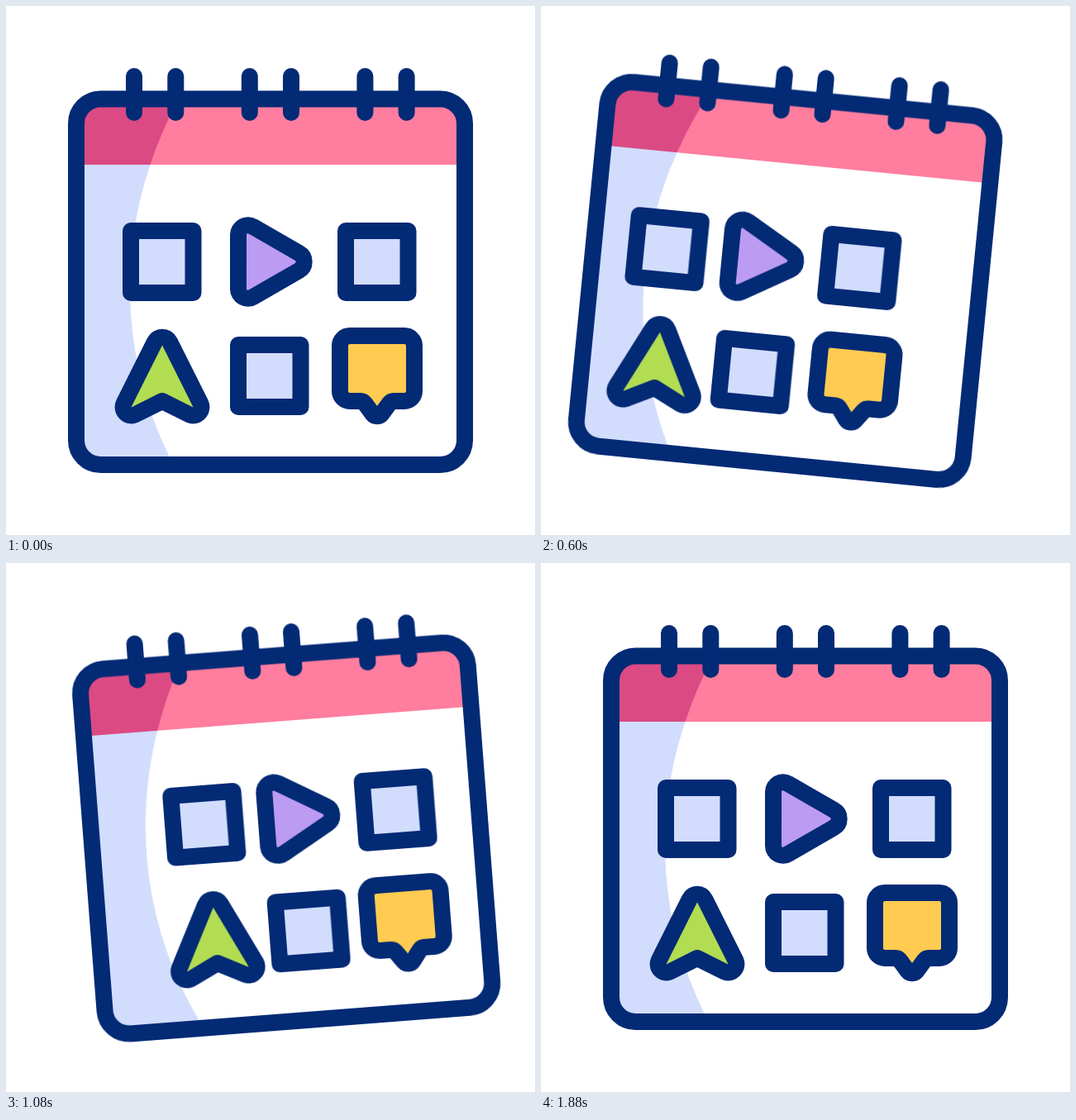
An HTML page that plays this animation: 640 px wide and 640 px high, repeating every 2000 ms.

```html
<!DOCTYPE html>
<html lang="en">
<head>
<meta charset="utf-8">
<title>Swinging calendar</title>
<style>
  html, body { margin: 0; width: 100%; height: 100%; overflow: hidden; background: #fff; }
  svg { display: block; width: 100%; height: 100%; }

  .line { stroke: #032a75; stroke-width: 20; stroke-linecap: round; stroke-linejoin: round; }

  .calendar { transform-origin: 320px 84px; animation: swing 2s infinite; }
  .icon { animation: slide 2s infinite; }

  @keyframes swing {
    0%, 2% { transform: rotate(0deg); animation-timing-function: cubic-bezier(.333, 0, .667, 1); }
    24.5% { transform: rotate(8.05deg); animation-timing-function: cubic-bezier(.333, 0, .667, 1); }
    46.5% { transform: rotate(-7.25deg); animation-timing-function: cubic-bezier(.3, 0, .6, 1); }
    70.5% { transform: rotate(3.1deg); animation-timing-function: cubic-bezier(.2, .2, .4, 1); }
    94%, 100% { transform: rotate(0deg); }
  }

  /* each icon slides left, right, left, then home */
  @keyframes slide {
    0%, 2% { transform: translateX(0); animation-timing-function: cubic-bezier(.33, 0, .45, 1); }
    24.5% { transform: translateX(var(--a)); animation-timing-function: cubic-bezier(.333, 0, .667, 1); }
    46.5% { transform: translateX(var(--b)); animation-timing-function: cubic-bezier(.3, 0, .6, 1); }
    70.5% { transform: translateX(var(--c)); animation-timing-function: cubic-bezier(.3, 0, .55, 1); }
    94%, 100% { transform: translateX(0); }
  }
</style>
</head>
<body>
<svg viewBox="0 0 640 640">
  <g class="calendar">
    <!-- page -->
    <rect x="85" y="112.5" width="470" height="442.5" rx="29.5" fill="#fff"/>
    <path fill="#d2dcfd" d="M90 192H174.5A462 462 0 0 0 198.5 547H112Q90 547 90 525Z"/>
    <path fill="#ff7d9e" d="M90 192V140Q90 118 112 118H528Q550 118 550 140V192Z"/>
    <path fill="#db4a83" d="M90 192V140Q90 118 112 118H206A462 462 0 0 0 174.5 192Z"/>
    <rect class="line" x="85" y="112.5" width="470" height="442.5" rx="29.5" fill="none"/>
    <path class="line" fill="none" d="M155 85V129M205.3 85V129M294.8 85V129M345 85V129M434.4 85V129M484.6 85V129"/>

    <!-- icons -->
    <g class="line">
      <rect class="icon" style="--a:-27.3px;--b:52px;--c:-15.4px" x="151" y="272" width="75.5" height="75" fill="#d2dcfd"/>
      <path class="icon" style="--a:-42.5px;--b:34px;--c:-29.8px" fill="#bc9bf3"
        d="M281 277A11.7 11.7 0 0 1 299 267L354.5 299A12 12 0 0 1 354.5 320L299 352A11.7 11.7 0 0 1 281 342Z"/>
      <rect class="icon" style="--a:-53px;--b:23px;--c:-40.5px" x="411" y="272" width="75.5" height="75" fill="#d2dcfd"/>
      <path class="icon" style="--a:-27px;--b:56px;--c:-15.7px" fill="#b2dc52"
        d="M179.8 406.5A10.2 10.2 0 0 1 198.2 406.5L235.5 481A10.2 10.2 0 0 1 222.3 494.6L189 478L155.7 494.6A10.2 10.2 0 0 1 142.5 481Z"/>
      <rect class="icon" style="--a:-39.6px;--b:37.5px;--c:-27.6px" x="281" y="410" width="75.5" height="75" fill="#d2dcfd"/>
      <path class="icon" style="--a:-44.5px;--b:22.3px;--c:-33.7px" fill="#ffcb50"
        d="M416 399H482A12 12 0 0 1 494 411V466A12 12 0 0 1 482 478H469Q466 478 464 480.5L454.5 493.5A7 7 0 0 1 443.5 493.5L434 480.5Q432 478 429 478H416A12 12 0 0 1 404 466V411A12 12 0 0 1 416 399Z"/>
    </g>
  </g>
</svg>
</body>
</html>
```
